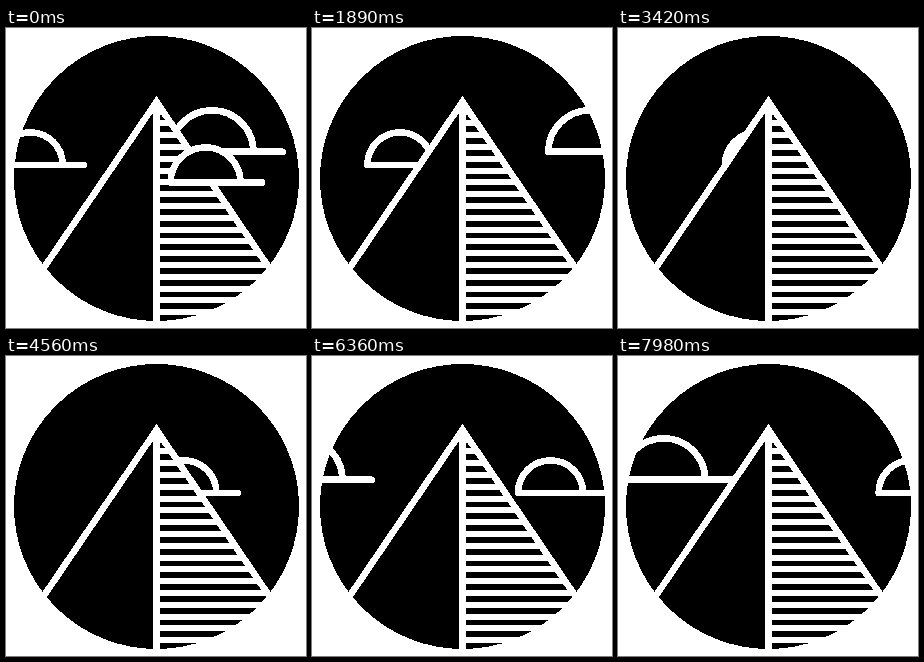
These frames come from a looping animation (300x300 px, 8000 ms). An HTML page:

```html
<!DOCTYPE html>
<html lang="en">
<head>
<meta charset="utf-8">
<title>Pyramid and clouds</title>
<style>
  html, body { margin: 0; width: 100%; height: 100%; overflow: hidden; background: #fff; }
  svg { display: block; width: 100vw; height: 100vh; shape-rendering: crispEdges; }
  .line { stroke: #fff; stroke-width: 6.7; stroke-linecap: round; stroke-linejoin: round; }
  .edge { stroke: #fff; stroke-width: 6.6; stroke-linejoin: miter; fill: none; }
</style>
</head>
<body>
<svg viewBox="0 0 300 300">
  <defs>
    <clipPath id="face"><path d="M150.5 73.8V300H304Z"/></clipPath>
  </defs>
  <rect width="300" height="300"/>
  <g id="back"></g>
  <path d="M-3 300L150.5 73.8L304 300Z"/>
  <g clip-path="url(#face)">
    <path d="M150.5 73.8V300H304Z" fill="#fff"/>
    <g id="bars"></g>
  </g>
  <path class="edge" d="M-3 300L150.5 73.8L304 300M150.3 74V300"/>
  <g id="front"></g>
  <!-- white surround leaves a round window -->
  <circle cx="150.5" cy="150.5" r="242.5" fill="none" stroke="#fff" stroke-width="200"/>
</svg>
<script>
const LOOP = 8000;
const NS = "http://www.w3.org/2000/svg";

// x: dome centre at time 0, speed: px per second, tail: base length right of centre
const clouds = [
  { layer: "back", x: 206, y: 123.8, r: 41.4, tail: 70.5, speed: 38 },
  { layer: "back", x: -233.6, y: 123.8, r: 41.4, tail: 70.5, speed: 35 },
  { layer: "back", x: 24.2, y: 136.9, r: 32.5, tail: 53.6, speed: 33.7 },
  { layer: "front", x: 199.5, y: 154.4, r: 35, tail: 56.5, speed: 80.8 }
];

function add(parent, tag, attrs) {
  const el = document.createElementNS(NS, tag);
  for (const key in attrs) el.setAttribute(key, attrs[key]);
  return document.getElementById(parent).appendChild(el);
}

for (let i = 0; i < 18; i++) {
  add("bars", "rect", { x: 150, y: 86.5 + i * 11.8, width: 150, height: 5.8 });
}

for (const c of clouds) {
  c.el = add(c.layer, "path", {
    class: "line",
    d: `M${c.tail} 0H${-c.r}A${c.r} ${c.r} 0 0 1 ${c.r} 0`
  });
}

function draw(ms) {
  const t = ms / 1000;
  for (const c of clouds) {
    c.el.setAttribute("transform", `translate(${c.x + c.speed * t} ${c.y})`);
  }
}

const start = performance.now();
function tick() {
  draw((performance.now() - start) % LOOP);
  requestAnimationFrame(tick);
}
draw(0);
requestAnimationFrame(tick);
</script>
</body>
</html>
```
